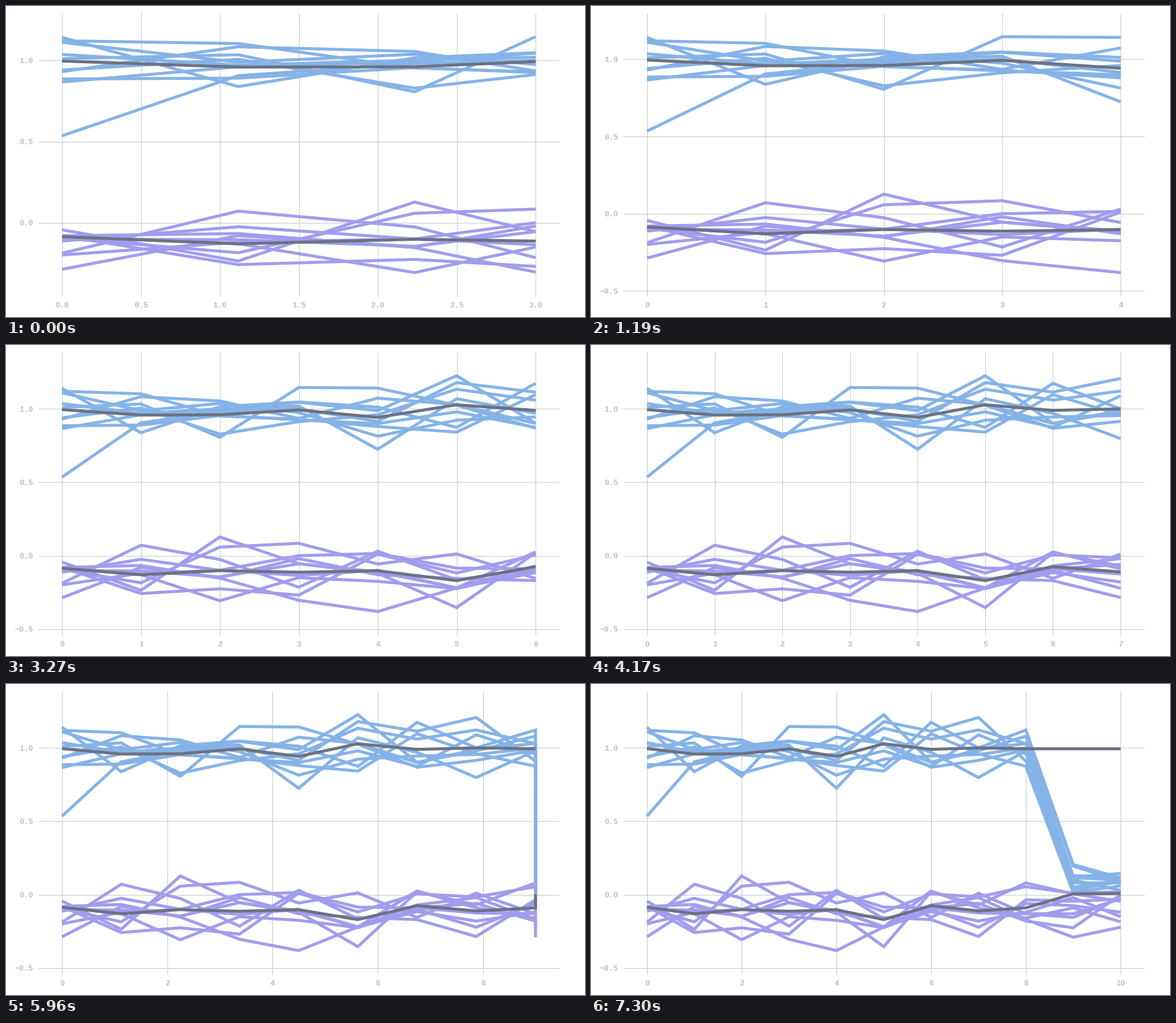
Write a matplotlib script that moves like this. It is 972 px wide and 522 px high and loops after 8 s.

```python
import math

import numpy as np
import matplotlib.pyplot as plt
from matplotlib.animation import FuncAnimation

W, H, DPI = 972, 522, 100
PX = 72 / DPI
LEFT, RIGHT, TOP, BOTTOM = 94, 889, 12, 487
GRID_LEFT, GRID_RIGHT = 54, 929

BLUE, PURPLE, DARK = "#85b3e7", "#a29cee", "#6b7282"
GRID, LABEL = "#c3c8cd", "#b9c0c7"

FRAMES, INTERVAL = 200, 40      # ms
SAMPLE = 149                    # the chart is redrawn once per sample
PERIOD = 1015.2                 # time between two new data points
EASE_TIME = 250
START, FIRST = 153, 3           # time into the first transition, its last index

# One row per series, in thousandths
upper = np.array([
    [535, 905, 980, 1000, 915, 1179, 1114, 1207, 910, 30, 90],
    [1141, 838, 1015, 1047, 1012, 874, 1174, 1000, 1122, 205, 115],
    [1120, 1103, 952, 930, 880, 842, 1097, 960, 875, 15, 60],
    [1110, 988, 1037, 975, 814, 923, 945, 955, 1000, 115, 100],
    [1036, 970, 1000, 1020, 725, 1069, 970, 798, 980, 80, 80],
    [1010, 1034, 806, 1146, 1142, 1025, 868, 915, 985, 100, 30],
    [930, 1083, 1054, 935, 1073, 1030, 900, 990, 1030, 120, 145],
    [940, 1006, 828, 913, 960, 1134, 1060, 1122, 1030, 130, 120],
    [885, 890, 955, 925, 900, 980, 874, 1089, 960, 50, 100],
    [866, 960, 990, 1045, 988, 1226, 902, 980, 1080, 195, 90],
]) / 1000

lower = np.array([
    [-188, 71, -26, -215, 30, -165, -90, -60, -180, -226, 0],
    [-113, -25, -100, 0, 15, -85, -90, -125, -130, -130, -30],
    [-80, -67, -153, -304, -381, -220, 25, -90, -160, -90, -185],
    [-44, -236, 127, -55, -120, -354, 20, -70, 80, 5, -45],
    [-80, -258, -226, -269, 10, -118, 5, -15, 54, 10, 20],
    [-95, -185, 58, 84, -57, 12, -155, 10, -130, -155, -20],
    [-199, -120, -100, -135, -100, -220, -70, -20, -170, -290, -222],
    [-287, -80, -150, -20, -130, -155, -170, -285, -35, -45, -30],
    [-100, -105, -145, -55, -110, -220, -115, -180, -120, -20, -150],
    [-85, -130, -307, -150, -175, -225, -100, -222, -60, -75, -120],
]) / 1000

centres = np.array([
    [995, 958, 960, 993, 942, 1028, 990, 1000, 994, 994, 994],
    [-86, -130, -102, -113, -103, -170, -75, -111, -90, 5, 8],
]) / 1000

light = np.vstack([upper, lower])
series = np.vstack([light, centres])
colors = [BLUE] * len(upper) + [PURPLE] * len(lower) + [DARK] * 2


def domain(n):
    """Value range of points 0..n, padded by a tenth on each side."""
    lo, hi = light[:, :n + 1].min(), light[:, :n + 1].max()
    pad = (hi - lo) / 10
    return lo - pad, hi + pad


def x_px(i, n):
    return LEFT + (RIGHT - LEFT) * i / n


def y_px(v, n):
    lo, hi = domain(n)
    return BOTTOM - (BOTTOM - TOP) * (v - lo) / (hi - lo)


def ease(t):
    return 4 * t ** 3 if t < 0.5 else 1 - 4 * (1 - t) ** 3


def ticks(lo, hi):
    """Round tick values, about five of them."""
    raw = (hi - lo) / 5
    power = 10 ** math.floor(math.log10(raw))
    ratio = raw / power
    factor = 10 if ratio >= 50 ** .5 else 5 if ratio >= 10 ** .5 else 2 if ratio >= 2 ** .5 else 1
    step = factor * power
    first, last = math.ceil(lo / step - 1e-9), math.floor(hi / step + 1e-9)
    form = "{:.0f}" if step >= 1 else "{:.1f}"
    values = [k * step for k in range(first, last + 1)]
    return values, [form.format(v).replace("-", "\u2212") for v in values]


def points(n, e):
    """Pixel positions of all series while point n is being added."""
    idx = np.arange(n + 1)
    x, y = x_px(idx, n), y_px(series[:, :n + 1], n)
    x[:n] += (1 - e) * (x_px(idx[:n], n - 1) - x[:n])
    y[:, :n] += (1 - e) * (y_px(series[:, :n], n - 1) - y[:, :n])
    return x, y


fig = plt.figure(figsize=(W / DPI, H / DPI), dpi=DPI, facecolor="white")
ax = fig.add_axes([0, 0, 1, 1])
ax.set_xlim(0, W)
ax.set_ylim(H, 0)
ax.axis("off")

grid, = ax.plot([], [], color=GRID, lw=PX, snap=True, solid_capstyle="butt", zorder=1)
lines = [ax.plot([], [], color=c, lw=5 * PX, solid_capstyle="butt",
                 solid_joinstyle="miter", zorder=2)[0] for c in colors]
font = dict(family="Liberation Mono", weight="bold", size=13 * PX, color=LABEL, va="baseline")
x_labels = [ax.text(0, 505.5, "", ha="center", **font) for _ in range(8)]
y_labels = [ax.text(45, 0, "", ha="right", **font) for _ in range(5)]


def draw_axes(n):
    gx, gy = [], []
    xs, x_text = ticks(0, n)
    ys, y_text = ticks(*domain(n))
    for label in x_labels + y_labels:
        label.set_text("")
    for label, v, text in zip(x_labels, xs, x_text):
        px = x_px(v, n)
        label.set_x(px)
        label.set_text(text)
        gx += [px, px, np.nan]
        gy += [TOP, BOTTOM, np.nan]
    for label, v, text in zip(y_labels, ys, y_text):
        py = y_px(v, n)
        label.set_y(py + 4.5)
        label.set_text(text)
        gx += [GRID_LEFT, GRID_RIGHT, np.nan]
        gy += [py, py, np.nan]
    grid.set_data(gx, gy)


def update(frame):
    sample = (frame + 1) * INTERVAL // SAMPLE
    added, age = divmod(START + sample * SAMPLE, PERIOD)
    n = FIRST + int(added)
    draw_axes(n)
    x, y = points(n, ease(min(age / EASE_TIME, 1)))
    for line, row in zip(lines, y):
        line.set_data(x, row)
    return [grid, *lines, *x_labels, *y_labels]


anim = FuncAnimation(fig, update, frames=FRAMES, interval=INTERVAL,
                     repeat=True, repeat_delay=0, blit=False)
plt.show()
```
